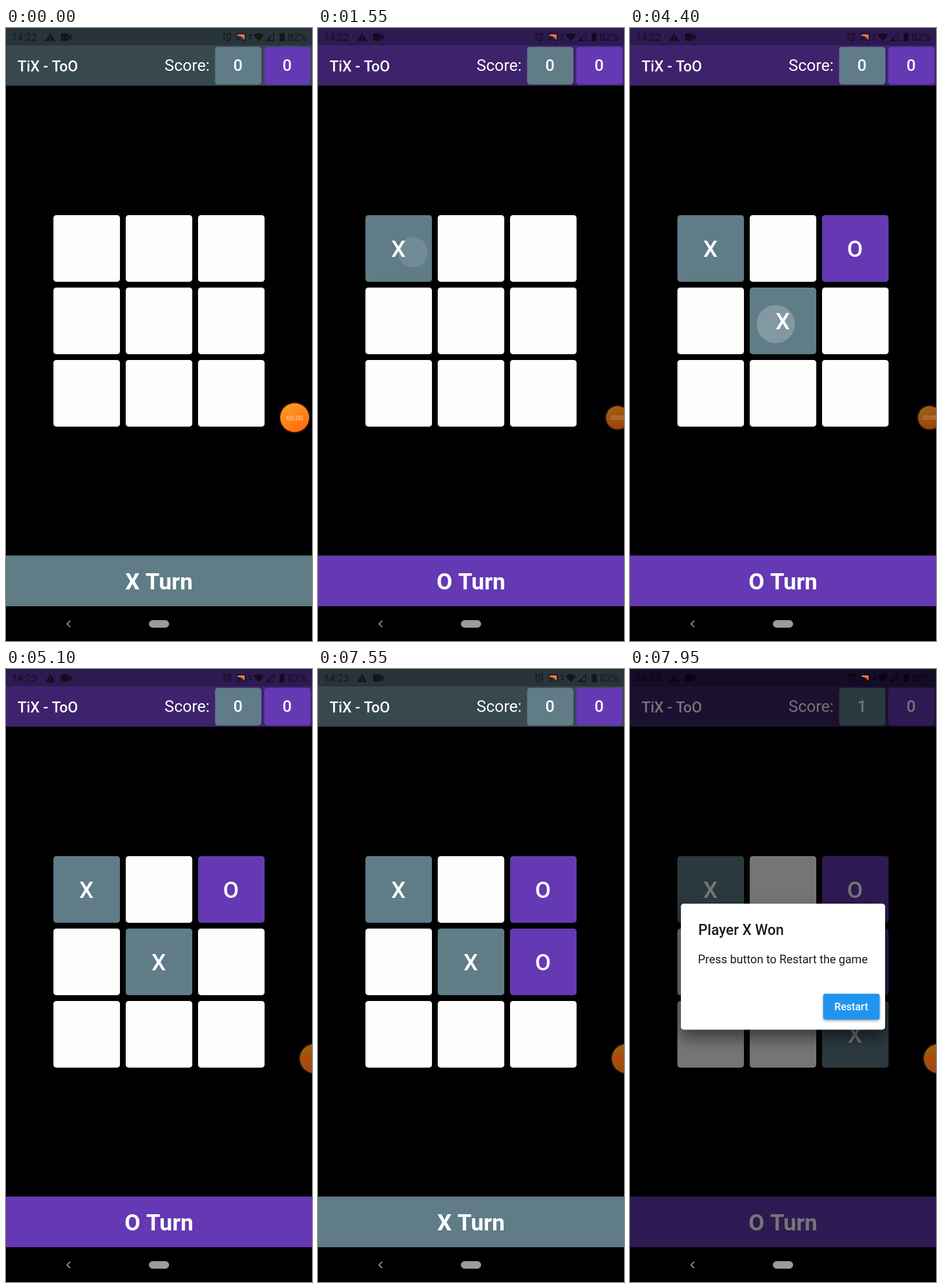
Write an HTML page with a canvas that moves like this. It is 529 px wide and 1058 px high and loops after 8 s.

```html
<!DOCTYPE html>
<html lang="en">
<head>
<meta charset="utf-8">
<title>Tic-tac-toe</title>
<style>
html, body { margin: 0; width: 100%; height: 100%; overflow: hidden; background: #000; }
canvas { display: block; }
</style>
</head>
<body>
<canvas width="529" height="1058"></canvas>
<script>
const ctx = document.querySelector('canvas').getContext('2d');
const LOOP = 8000, STEP = 50;
const SLATE = '#5f7c87', PURPLE = '#6439b3', INK = 'rgba(0,0,0,.55)';
const THEMES = {
  X: { main: SLATE, header: '#38484f', status: '#28343a' },
  O: { main: PURPLE, header: '#3e236c', status: '#2d1a50' }
};
// Each move: time, mark, cell, touch point, touch radius, ripple strength
const MOVES = [
  { at: 1550, mark: 'X', cell: 0, x: 164, y: 387, r: 26, alpha: .12 },
  { at: 3050, mark: 'O', cell: 2, x: 377, y: 380, r: 27, alpha: .22 },
  { at: 4400, mark: 'X', cell: 4, x: 252, y: 511, r: 33, alpha: .22 },
  { at: 6150, mark: 'O', cell: 5, x: 379, y: 496, r: 27, alpha: .22 },
  { at: 7600, mark: 'X', cell: 8, x: 380, y: 638, r: 27, alpha: .22 }
];
const TICKS = [900, 1550, 2150, 3200, 4300];
const DIALOG_AT = 7650;

const mix = (a, b, p) => a + (b - a) * p;
const progress = (t, start, length) => Math.min(1, Math.max(0, (t - start) / length));
const easeOut = p => 1 - (1 - p) ** 3;

function text(str, x, y, size, weight = 400, color = '#fff', align = 'left') {
  ctx.font = `${weight} ${size}px Roboto, sans-serif`;
  ctx.fillStyle = color;
  ctx.textAlign = align;
  ctx.fillText(str, x, y);
}

function rect(x, y, w, h, color, r = 0) {
  ctx.fillStyle = color;
  ctx.beginPath();
  ctx.roundRect(x, y, w, h, r);
  ctx.fill();
}

function circle(x, y, r, color) {
  ctx.fillStyle = color;
  ctx.beginPath();
  ctx.arc(x, y, r, 0, 7);
  ctx.fill();
}

function shape(path, color, lineWidth) {
  const p = new Path2D(path);
  if (lineWidth) {
    ctx.strokeStyle = color;
    ctx.lineWidth = lineWidth;
    ctx.stroke(p);
  } else {
    ctx.fillStyle = color;
    ctx.fill(p, 'evenodd');
  }
}

function shadowed(blur, dy, color, draw) {
  ctx.save();
  ctx.shadowBlur = blur;
  ctx.shadowOffsetY = dy;
  ctx.shadowColor = color;
  draw();
  ctx.restore();
}

function drawHeader(theme, scoreX) {
  rect(0, 0, 529, 30, theme.status);
  rect(0, 30, 529, 69.5, theme.header);
  text('TiX - ToO', 20, 74.5, 25.5, 500);
  text('Score:', 274, 74, 28);
  [[361.5, SLATE, scoreX], [446.5, PURPLE, 0]].forEach(([x, color, score]) => {
    rect(x, 32.5, 80, 65, color, 5);
    text(score, x + 39.5, 74, 28, 500, '#fff', 'center');
  });
}

function drawStatusIcons(t) {
  text(t < 5000 ? '14:22' : '14:23', 9.5, 22, 17.8, 400, INK);
  shape('M76.5 8 L85 22.5 H68 Z M75.6 13 V17.5 H77.4 V13 Z M75.6 19 V20.8 H77.4 V19 Z', INK);
  shape('M97 9 H106 Q108 9 108 11 V13.5 L113 10 V21 L108 17.5 V20 Q108 22 106 22 H97 Q95 22 95 20 V11 Q95 9 97 9 Z', INK);
  shape('M388.5 16 A6 6 0 1 1 376.5 16 A6 6 0 1 1 388.5 16 M382.5 12 V16.5 L385.5 18.5 M375.5 11 L379 8 M389.5 11 L386 8', INK, 1.6);
  shape('M399 12 V9.5 H414 V21.5 H408.5 M399 19.5 Q401.5 19.5 401.5 22 M399 16 Q405 16 405 22', INK, 1.5);
  shape('M400.5 11 H412.5 V20.5 Q408 13.5 400.5 13.5 Z', '#f4743b');
  shape('M420 13.5 L422.5 9.5 L425 13.5 Z M420 16 L422.5 20 L425 16 Z', INK);
  shape('M428 12 Q437 5 446 12 L437 23 Z', INK);
  shape('M450.5 21.7 L463 9.5 V21.7 Z', INK, 1.5);
  shape('M456 17 V21.7 H451 Z', INK);
  shape('M475.5 8 H479.5 V9.5 H482 V23 H473 V9.5 H475.5 Z', INK);
  text('82%', 487, 22, 17.8, 400, INK);
}

function drawRipple(move, t, x, y) {
  const age = t - move.at;
  const alpha = move.alpha * (1 - progress(age, 50, 250));
  if (!alpha) return;
  ctx.save();
  ctx.beginPath();
  ctx.roundRect(x, y, 115, 115, 5);
  ctx.clip();
  circle(move.x, move.y, mix(move.r, 96, progress(age, 0, 150)), `rgba(255,255,255,${alpha})`);
  ctx.restore();
}

function drawBoard(played, t) {
  for (let i = 0; i < 9; i++) {
    const x = 82 + i % 3 * 125, y = 323 + Math.floor(i / 3) * 125;
    const move = played.find(m => m.cell === i);
    rect(x, y, 115, 115, move ? THEMES[move.mark].main : '#fefffd', 5);
    if (!move) continue;
    drawRipple(move, t, x, y);
    text(move.mark, x + 57, y + 72, 39.5, 500, '#fff', 'center');
  }
}

function drawNavigation() {
  shape('M111 1023 L105.5 1028.5 L111 1034', '#a8a8a8', 1.7);
  rect(247, 1022, 35, 13, '#9b9b9b', 6.5);
}

function drawDialog(p) {
  ctx.globalAlpha = p;
  rect(0, 0, 529, 998, 'rgba(0,0,0,.54)');
  shadowed(26, 14, 'rgba(0,0,0,.5)', () => rect(88, 405, 353, 217.5, '#fefffe', 5));
  text('Player X Won', 118, 459, 25, 500, '#1c1c1c');
  text('Press button to Restart the game', 117.5, 508, 20, 400, '#1c1c1c');
  shadowed(4, 2, 'rgba(0,0,0,.4)', () => rect(334, 560.5, 97.5, 44.5, '#2095f0', 4));
  text('Restart', 382.5, 589, 18, 500, '#fff', 'center');
  ctx.globalAlpha = 1;
}

function drawBubble(t) {
  const slide = easeOut(progress(t, 250, 550));
  const shrink = progress(t, 850, 300);
  const hide = easeOut(progress(t, 4450, 350));
  const x = mix(mix(499, 518, slide), 533, hide);
  const scale = mix(mix(1, .8, shrink), 1, hide);
  const y = 672.5, r = 25 * scale;
  ctx.save();
  circle(x, y, r + 2.5, 'rgba(45,22,6,.75)');
  const fill = ctx.createLinearGradient(x - r / 2, y - r, x + r / 2, y + r);
  fill.addColorStop(0, '#ff9a24');
  fill.addColorStop(1, '#ff6a0e');
  circle(x, y, r, '#000');
  ctx.globalAlpha = mix(1, .62, shrink);
  circle(x, y, r, fill);
  if (hide > .5) {
    circle(519.5, y, 6, '#cf3a08');
  } else {
    const seconds = TICKS.filter(at => t >= at).length;
    text(`00:0${seconds}`, x, y + 4 * scale, 11.5 * scale, 400, '#ffd3b4', 'center');
  }
  ctx.restore();
}

function draw(t) {
  const played = MOVES.filter(m => t >= m.at);
  const turn = played.length % 2 ? 'O' : 'X';
  const won = played.length === MOVES.length;
  rect(0, 0, 529, 1058, '#000');
  drawHeader(THEMES[turn], won ? 1 : 0);
  drawBoard(played, t);
  rect(0, 910.5, 529, 87.5, THEMES[turn].main);
  text(`${turn} Turn`, 264.5, 968.5, 39.5, 700, '#fff', 'center');
  drawNavigation();
  if (t >= DIALOG_AT) drawDialog(easeOut(progress(t, DIALOG_AT - STEP, 200)));
  drawStatusIcons(t);
  drawBubble(t);
}

function frame() {
  const t = performance.now() % LOOP;
  draw(Math.floor(t / STEP) * STEP);
  requestAnimationFrame(frame);
}
frame();
</script>
</body>
</html>
```
